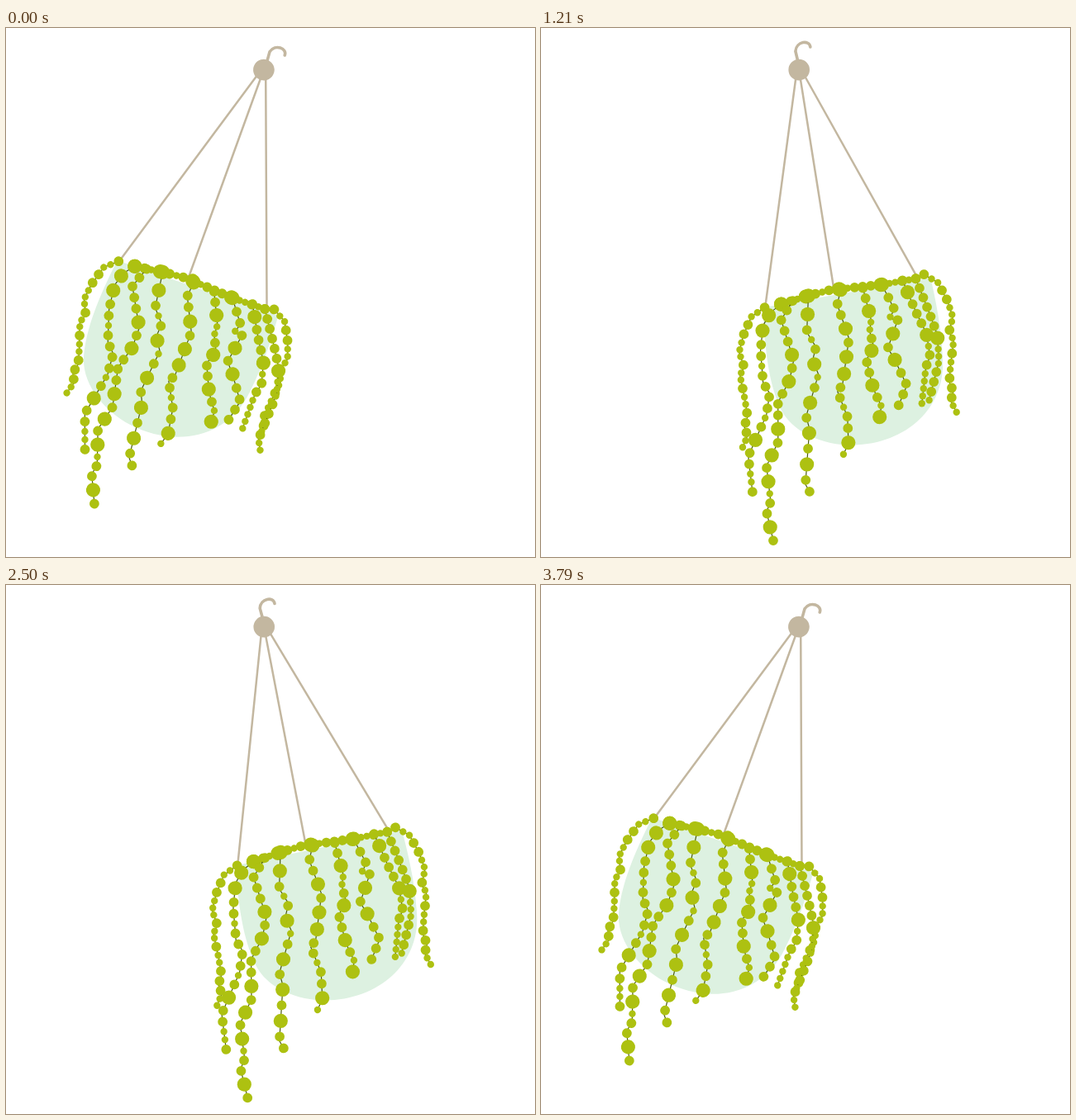
An HTML page that plays this animation: 640x640 px, repeating every 3870 ms.

```html
<!DOCTYPE html>
<html lang="en">
<head>
<meta charset="utf-8">
<title>Swinging hanging plant</title>
<style>
  html, body { margin: 0; width: 100%; height: 100%; overflow: hidden; background: #fff; }
  svg { display: block; width: 100%; height: 100%; }
  .rope { fill: none; stroke: #c3b7a0; stroke-width: 2.5; }
  .hook { stroke-width: 3.6; stroke-linecap: round; }
  .stem { fill: none; stroke: #4b5a12; stroke-width: 1.2; stroke-linejoin: round; }
  .vine { fill: #adc111; }
</style>
</head>
<body>
<svg viewBox="0 0 640 640">
  <g id="plant">
    <path fill="#ddf1e1" d="M267 338C269 390 273 425 286 457C300 490 340 505 375 505C440 504 488 460 484 400C483 365 476 330 470 303Z"/>
    <path class="rope" d="M309.7 50L270 335M312 50L353 317M314.5 50L453 301"/>
    <path class="rope hook" d="M311 41L308 28C309 16 325 14 326 23"/>
    <circle cx="312.2" cy="50.6" r="12.8" fill="#c3b7a0"/>
  </g>
</svg>
<script>
const LOOP = 3870, FPS = 14, LAST_STEP = 53;
const SWING_STEPS = 53.6, LEAD = .36;   // steps per full swing, head start
const REACH = 20, REST = -8.64;         // degrees; the artwork is drawn at REST
const RADIUS = { S: 4.2, M: 5.9, L: 8.6 };
const plant = document.getElementById('plant');
const vines = [];

function add(parent, tag, attrs) {
  const el = document.createElementNS('http://www.w3.org/2000/svg', tag);
  for (const key in attrs) el.setAttribute(key, attrs[key]);
  return parent.appendChild(el);
}

// Threads beads along a stem, each gap in proportion to its neighbours' radii.
// follow: share of the pot's rotation that the vine takes up
function addVine(x, y, follow, sizes, points, pose = '') {
  const el = add(plant, 'g', { class: 'vine' });
  const stem = add(el, 'polyline', { class: 'stem', points });
  const radii = [...sizes].map(size => RADIUS[size]);
  let reach = 0;
  const stops = radii.map((r, i) => i ? reach += radii[i - 1] + r : 0);
  const scale = stem.getTotalLength() / reach;
  radii.forEach((r, i) => {
    const p = stem.getPointAtLength(stops[i] * scale);
    add(el, 'circle', { cx: p.x, cy: p.y, r });
  });
  vines.push({ el, x, y, follow, pose });
}

// rim of the pot
addVine(289, 334, 1, 'LMSLMSMLSMMMLSSMSM', '0,0 33,-10 60,-17 122,-23 163,-30');

// the outer vines are mirror images
const outer = ['MSSMMSSSMSSMSSMMMSS', '0,0 -16,11 -26,34 -31,54 -25,72 -30,82 -24,112 -21,132 -25,144 -21,155 -27,169'];
addVine(269, 338, .434, ...outer);
addVine(462, 299, .655, ...outer, 'rotate(-4) scale(-1 1)');

// hanging vines, left to right
addVine(289, 334, .225, 'LLLMMSMMMMSMLMMSSM', '0,0 -13,10 -22,26 -25,56 -22,95 -14,108 -18,134 -40,184 -35,227');
addVine(303, 330, .272, 'MMMMMLMLMMMLMLMLSMMLM', '0,0 -14,23 1,72 -4,96 -18,123 -18,171 -32,200 -27,243 -32,255 -24,290');
addVine(322, 324, .323, 'LLMSMLSMLMLMLMM', '0,0 -2,44 9,62 5,78 12,95 -3,146 1,161 -4,228 1,237');
addVine(361, 317, .433, 'LMMLMLLMMSMMLS', '0,0 -4,18 10,59 2,115 -4,123 8,154 9,186 3,199');
addVine(388, 315, .3, 'MMLSSMLMMLMSL', '0,0 10,39 8,52 13,71 4,87 12,121 22,143 20,156');
addVine(411, 311, .333, 'LMMSMLMLMMMM', '0,0 15,30 9,41 19,43 7,77 15,90 30,122 20,146');
addVine(436, 306, .465, 'MLMMMLSMMSSSSS', '0,0 16,38 29,65 33,92 28,105 23,149');
addVine(452, 304, .27, 'MMMMMMLSSSMMMS', '0,0 17,43 26,68 28,100 16,147');

function draw(ms) {
  const step = Math.min(LAST_STEP, Math.floor((ms % LOOP + 5) * FPS / 1000));
  const turn = REACH * Math.cos(2 * Math.PI * (step + LEAD) / SWING_STEPS) - REST;
  plant.setAttribute('transform', `rotate(${turn} 312 50)`);
  for (const { el, x, y, follow, pose } of vines)
    el.setAttribute('transform', `translate(${x} ${y}) rotate(${(follow - 1) * turn}) ${pose}`);
}

let start;
function tick(now) {
  start ??= now;
  draw(now - start);
  requestAnimationFrame(tick);
}
draw(0);
requestAnimationFrame(tick);
</script>
</body>
</html>
```
